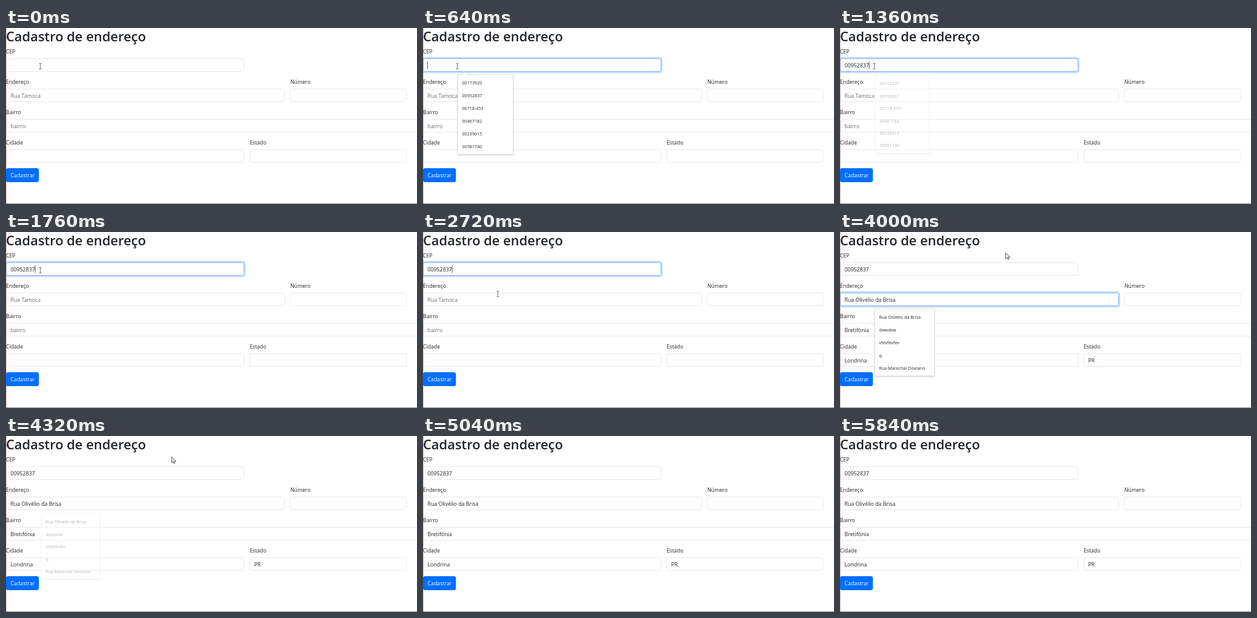
Write an HTML page that moves like this. It is 678 px wide and 290 px high and loops after 5.92 s.

```html
<!DOCTYPE html>
<html lang="pt-BR">
<head>
<meta charset="utf-8">
<title>Cadastro de endereço</title>
<style>
  html, body { margin: 0; width: 100%; height: 100%; overflow: hidden; background: #fff; }
  svg { display: block; width: 678px; height: 290px; }
  text { font: 8.8px "Open Sans", "Noto Sans", sans-serif; fill: #212529; }
  .title { font-size: 21.9px; font-weight: 600; }
  .label { font-size: 8.7px; }
  .hint { fill: #666c72; }
  .field { fill: #fff; stroke: #e8eaed; }
  .border { fill: #fff; stroke: #86b7fe; }
  .glow { fill: none; stroke: #c2dbfe; stroke-width: 2.4; }
  .caret { fill: #555; }
  .popup { transform-box: fill-box; transform-origin: center; }
  .popup text { font-size: 7.2px; fill: #2a2a2a; }
  .panel { fill: #fff; stroke: #dcdcdc; stroke-width: .7; filter: drop-shadow(0 1px 1.5px #0003); }

  /* Hard switches */
  .switch { animation: 5.92s step-end infinite; }
  .empty { animation-name: empty; }
  .filled { animation-name: filled; }
  .code { animation-name: code; }
  .caret-a { animation-name: caret-a; }
  .caret-b { animation-name: caret-b; }
  .caret-c { animation-name: caret-c; }
  .caret-d { animation-name: caret-d; }
  .beam { animation-name: beam; }
  .arrow { animation-name: arrow; }
  @keyframes empty { 0% { opacity: 1 } 55.405%, 100% { opacity: 0 } }
  @keyframes filled { 0% { opacity: 0 } 55.405%, 100% { opacity: 1 } }
  @keyframes code { 0% { opacity: 0 } 21.622%, 100% { opacity: 1 } }
  @keyframes caret-a { 0% { opacity: 0 } 5.405% { opacity: 1 } 13.851%, 100% { opacity: 0 } }
  @keyframes caret-b {
    0% { opacity: 0 } 21.622% { opacity: 1 } 30.068% { opacity: 0 }
    38.514% { opacity: 1 } 46.959%, 100% { opacity: 0 }
  }
  @keyframes caret-c { 0% { opacity: 0 } 51.351% { opacity: 1 } 55.405%, 100% { opacity: 0 } }
  @keyframes caret-d { 0% { opacity: 0 } 55.405% { opacity: 1 } 63.851%, 100% { opacity: 0 } }
  @keyframes beam { 0% { opacity: 1 } 59.459%, 100% { opacity: 0 } }
  @keyframes arrow { 0% { opacity: 0 } 59.459%, 100% { opacity: 1 } }

  /* Fades */
  .fade { animation: 5.92s linear infinite; }
  .focus-code { animation-name: focus-code; }
  .focus-street { animation-name: focus-street; }
  .popup-code { animation-name: popup-code; }
  .popup-street { animation-name: popup-street; }
  @keyframes focus-code {
    0%, 5.405% { opacity: 0 } 8.108%, 51.351% { opacity: 1 } 53.378%, 100% { opacity: 0 }
  }
  @keyframes focus-street {
    0%, 51.351% { opacity: 0 } 53.378%, 70.27% { opacity: 1 } 72.9%, 100% { opacity: 0 }
  }
  @keyframes popup-code {
    0%, 6.75% { opacity: 0; transform: none }
    6.757%, 20.946% { opacity: 1; transform: none }
    23.986%, 100% { opacity: 0; transform: scale(.96) }
  }
  @keyframes popup-street {
    0%, 52.7% { opacity: 0; transform: none }
    52.703%, 70.946% { opacity: 1; transform: none }
    73.986%, 100% { opacity: 0; transform: scale(.96) }
  }

  .pointer { animation: pointer 5.92s infinite; }
  @keyframes pointer {
    0% { transform: translate(56px, 63px) }
    37.838% { transform: translate(56px, 63px); animation-timing-function: steps(6) }
    45.946% { transform: translate(123px, 102px); animation-timing-function: steps(2) }
    48.649% { transform: translate(126px, 106px) }
    52.703% { transform: translate(126px, 106px); animation-timing-function: steps(3) }
    56.757% { transform: translate(164px, 95px); animation-timing-function: steps(6) }
    64.865% { transform: translate(276px, 40px) }
    75.676% { transform: translate(276px, 40px); animation-timing-function: steps(6) }
    83.784%, 100% { transform: translate(300px, -20px) }
  }
</style>
</head>
<body>
<svg viewBox="0 0 678 290">
  <text class="title" x="0" y="22">Cadastro de endereço</text>

  <g class="field">
    <rect x=".5" y="50.5" width="392" height="21" rx="3"/>
    <rect x=".5" y="100.5" width="459" height="21" rx="3"/>
    <rect x="469" y="100.5" width="191.5" height="21" rx="3"/>
    <rect x=".5" y="150.5" width="690" height="21" rx="3"/>
    <rect x=".5" y="200.5" width="392" height="21" rx="3"/>
    <rect x="402" y="200.5" width="258.5" height="21" rx="3"/>
  </g>

  <g class="fade focus-code">
    <rect class="glow" x="-1" y="49" width="395" height="24" rx="4"/>
    <rect class="border" x=".5" y="50.5" width="392" height="21" rx="3"/>
  </g>
  <g class="fade focus-street">
    <rect class="glow" x="-1" y="99" width="462" height="24" rx="4"/>
    <rect class="border" x=".5" y="100.5" width="459" height="21" rx="3"/>
  </g>

  <text class="label" x="0" y="42">CEP</text>
  <text class="label" x="0" y="92">Endereço</text>
  <text class="label" x="469" y="92">Número</text>
  <text class="label" x="0" y="142">Bairro</text>
  <text class="label" x="0" y="192">Cidade</text>
  <text class="label" x="402" y="192">Estado</text>

  <text class="switch code" x="7.5" y="64.7">00952837</text>
  <g class="switch empty">
    <text class="hint" x="7.5" y="114.7">Rua Tamoca</text>
    <text class="hint" x="7.5" y="164.7">bairro</text>
  </g>
  <g class="switch filled">
    <text x="7.5" y="114.7">Rua Olivélio da Brisa</text>
    <text x="7.5" y="164.7">Bretifónia</text>
    <text x="7.5" y="214.7">Londrina</text>
    <text x="409.5" y="214.7">PR</text>
  </g>

  <g class="caret">
    <rect class="switch caret-a" x="7" y="55" width="1" height="12.5"/>
    <rect class="switch caret-b" x="47.5" y="55" width="1" height="12.5"/>
    <rect class="switch caret-c" x="7" y="105" width="1" height="12.5"/>
    <rect class="switch caret-d" x="90.5" y="105" width="1" height="12.5"/>
  </g>

  <path d="M.5 0V290" stroke="#a07878" stroke-dasharray="1 1"/>
  <path d="M0 289.5H678" stroke="#8f8585"/>

  <rect y="231" width="54.3" height="23" rx="3.5" fill="#006eff"/>
  <text x="7.5" y="246" style="fill:#fff">Cadastrar</text>

  <g class="popup fade popup-code">
    <path class="panel" d="M57.5 76.5H65.5L69 73L72.5 76.5H148.5V208H57.5Z"/>
    <text x="64.5" y="93.1">00173920</text>
    <text x="64.5" y="114.1">00952837</text>
    <text x="64.5" y="135.1">00718-453</text>
    <text x="64.5" y="156">00467182</text>
    <text x="64.5" y="177">00239615</text>
    <text x="64.5" y="198">00581740</text>
  </g>
  <g class="popup fade popup-street">
    <path class="panel" d="M57.5 126.5H65.5L69 123L72.5 126.5H155.5V237H57.5Z"/>
    <text x="64.5" y="143.1">Rua Olivélio da Brisa</text>
    <text x="64.5" y="164.1">dewdew</text>
    <text x="64.5" y="185.1">vfevfevfev</text>
    <text x="64.5" y="206">q</text>
    <text x="64.5" y="227">Rua Marechal Dovrano</text>
  </g>

  <g class="pointer">
    <path class="switch beam" d="M-1.5 -4.5H2.5M.5 -4.5V4.5M-1.5 4.5H2.5" fill="none" stroke="#666" stroke-width=".9"/>
    <path class="switch arrow" d="M-2.5 -5.5V4L-.3 2L1.2 5.3L2.6 4.7L1.2 1.5H4.2Z" fill="#fff" stroke="#222" stroke-width=".8"/>
  </g>
</svg>
</body>
</html>
```
